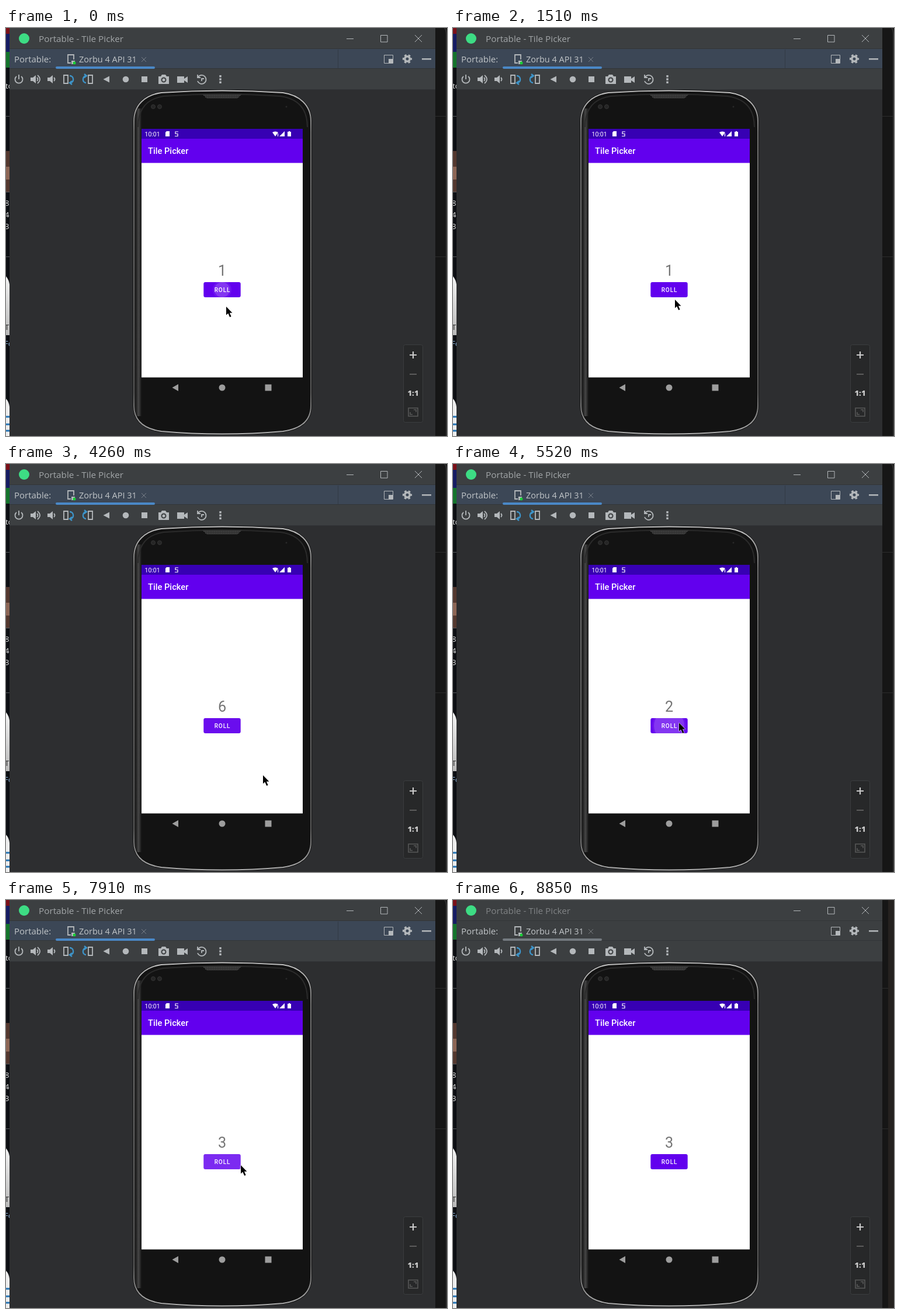
Animation, 755 px wide and 700 px high, one loop 8.95 s. Source, as an HTML page:

```html
<!DOCTYPE html>
<html lang="en">
<head>
<meta charset="utf-8">
<title>Tile Picker</title>
<style>
  html, body { margin: 0; width: 100%; height: 100%; overflow: hidden; background: #161616; }
  svg { display: block; width: 755px; height: 700px; }
  .ui { font-family: "Open Sans", sans-serif; }
  .app { font-family: Roboto, sans-serif; }
  .line { fill: none; stroke: #b4b8bb; stroke-width: 1.8; }
  .thin { fill: none; stroke: #b4b8bb; stroke-width: 1; }
  .icon { fill: #b4b8bb; }
  .blue { fill: none; stroke: #3d94c9; stroke-width: 2.3; }
  .nav { fill: #9d9d9d; }
  .bar { fill: #3c4756; }
  .tab { fill: #4a88c7; }
  .title { fill: #a2a6a8; }
  .blurred .bar { fill: #3c3f41; }
  .blurred .tab { fill: #747a80; }
  .blurred .title { fill: #808385; }
  .blurred .focused { display: none; }
  .behind { display: none; }
  .blurred .behind { display: inline; }
</style>
</head>
<body>
<svg id="stage" viewBox="0 0 755 700">
  <defs>
    <linearGradient id="rim">
      <stop offset="0" stop-color="#505050"/>
      <stop offset=".25" stop-color="#1d1d1d"/>
      <stop offset=".6" stop-color="#464646"/>
      <stop offset="1" stop-color="#151515"/>
    </linearGradient>
    <linearGradient id="edge" x2="0" y2="1">
      <stop offset="0" stop-color="#c4c4c4"/>
      <stop offset=".12" stop-color="#747474"/>
      <stop offset=".88" stop-color="#5c5c5c"/>
      <stop offset="1" stop-color="#b0b0b0"/>
    </linearGradient>
    <linearGradient id="paper" x2="0" y2="1">
      <stop offset="0" stop-color="#f4f4f4"/>
      <stop offset="1" stop-color="#b9b9b9"/>
    </linearGradient>
    <path id="body" d="M219 160C219 132 238 115 266 111Q370 104 474 111C502 115 522 132 522 160V648C522 675 503 688 474 692Q370 701 266 692C238 688 219 675 219 648Z"/>
    <clipPath id="bodyClip"><use href="#body"/></clipPath>
    <clipPath id="buttonClip"><rect x="338.300" y="436" width="63.400" height="26" rx="3"/></clipPath>
    <clipPath id="leftClip"><rect width="6" height="700"/></clipPath>
  </defs>

  <!-- desktop behind the window -->
  <rect width="755" height="700" fill="#161616"/>
  <g clip-path="url(#leftClip)">
    <rect width="6" height="700" fill="#0d0f13"/>
    <rect width="6" height="10" fill="#7b1018"/>
    <rect y="10" width="6" height="31" fill="#161c63"/>
    <rect y="41" width="6" height="27" fill="#14742c"/>
    <rect y="211" width="6" height="70" fill="#54382f"/>
    <rect y="238" width="6" height="22" fill="#8d6656"/>
    <path d="M0 426Q5 432 6 440V527H0Z" fill="url(#paper)"/>
    <path d="M0 636Q5 641 6 650V700H0Z" fill="#eee"/>
    <path d="M0 667H6M0 680H6M0 691H6" stroke="#2574b5" stroke-width="3"/>
    <path d="M0 151.500H6M0 392.500H6M0 281.500H6" stroke="#55585b"/>
    <g class="ui" font-size="13" fill="#e8e8e8">
      <text x="-1" y="104">to</text>
      <text x="-2" y="305">8</text><text x="-2" y="325">4</text><text x="-2" y="345">3</text>
      <text x="-3" y="546" fill="#8fb6df">Fo</text>
      <text x="-2" y="518" fill="#222">T</text>
    </g>
  </g>
  <path d="M735 151.500H753M735 392.500H753" stroke="#2c2c2c"/>
  <path d="M751 0Q754 4 754 12V700" fill="none" stroke="#303030" stroke-width="2"/>
  <rect class="behind" x="745" width="10" height="700" fill="#252220"/>

  <!-- window -->
  <rect x="6" width="729" height="700" fill="#2d2e30"/>
  <rect x="6" width="729" height="106" fill="#3c3f41"/>
  <rect class="bar" x="6" y="36" width="729" height="33"/>
  <path d="M6 35.500H735M6 69.500H735M6 105.500H735" stroke="#323538"/>
  <path class="focused" d="M568.500 37V69" stroke="#323a44"/>
  <rect class="tab" x="85" y="66" width="170" height="4" rx="2"/>
  <circle cx="31" cy="18" r="9" fill="#3ddc84"/>
  <g class="ui">
    <text class="title" x="56" y="24" font-size="15.300">Portable - Tile Picker</text>
    <g fill="#c1c5c8">
      <text x="14" y="59" font-size="15">Portable:</text>
      <text x="125" y="59" font-size="14.500">Zorbu 4 API 31</text>
    </g>
  </g>
  <path class="thin" d="M583 18.500H595M641.500 12.500H653V24H641.500ZM700 12L712 24M712 12L700 24"/>
  <path class="thin" stroke-opacity=".5" d="M232 50L240 58M240 50L232 58"/>
  <path class="line" d="M111 60H106V46H116V54"/>
  <path class="icon" d="M112 56H118V62H112Z"/>
  <circle cx="117" cy="60" r="2.500" fill="#19cf37"/>
  <path class="thin" d="M647.500 46.500H662.500V60.500H647.500Z"/>
  <path class="icon" d="M655 53H662V60H655ZM712 52H728V54.500H712Z"/>
  <g transform="translate(687 53)">
    <circle class="line" r="4.300" style="stroke-width:3.600"/>
    <circle class="line" r="6.700" style="stroke-width:2.800" stroke-dasharray="3.508" stroke-dashoffset="1.754"/>
  </g>

  <!-- toolbar -->
  <path class="line" d="M18 83A6.500 6.500 0 1 0 26 83M22 80V88"/>
  <path class="icon" d="M42 85H46L51 81V95L46 91H42ZM71 85H75L80 81V95L75 91H71Z"/>
  <path class="line" d="M53 85Q56 88 53 91M54 81Q62 88 54 95M82 85Q85 88 82 91"/>
  <path class="line" d="M99 81H106V95H99ZM141 81H148V95H141Z"/>
  <path class="blue" d="M109 82C117 82 117 94 110 94M113 91L109 94L113 97M138 82C130 82 130 94 137 94M134 79L138 82L134 85"/>
  <path class="icon" d="M177 82.500V93.500L166.500 88ZM232 83H242V93H232ZM293 83H305V94H293ZM305 87L311 83V94L305 90Z"/>
  <circle class="icon" cx="205" cy="88" r="5.300"/>
  <path class="icon" d="M261 83H265L267 80H273L275 83H279V96H261Z"/>
  <circle cx="270" cy="89" r="3.500" fill="none" stroke="#3c3f41" stroke-width="2"/>
  <path class="line" d="M329 84A7.500 7.500 0 1 1 328 91M328 80V85H333M335 91V87H339"/>
  <path class="icon" d="M365.300 81h3.400v3.400h-3.400zM365.300 86.300h3.400v3.400h-3.400zM365.300 91.600h3.400v3.400h-3.400z"/>

  <!-- phone -->
  <use href="#body" fill="#131313"/>
  <g clip-path="url(#bodyClip)">
    <rect x="219" y="138" width="13" height="528" fill="url(#rim)"/>
    <path d="M226 170C226 137 243 121 270 117Q370 110 470 117C498 121 516 137 516 170" fill="none" stroke="#2b2b2b" stroke-width="2"/>
    <path id="cleared" d="M338 599H508V634H338ZM512 436H521V650H512Z"/>
  </g>
  <use href="#body" fill="none" stroke="#101010" stroke-width="3.600"/>
  <use href="#body" fill="none" stroke="url(#edge)" stroke-width="2"/>
  <path d="M336 113H404L396 121H344Z" fill="#303030"/>
  <path d="M338 115.500H402M341 118.500H399" stroke="#505050" stroke-dasharray="2 1"/>
  <g fill="#262626" stroke="#343434"><circle cx="252" cy="135" r="3.500"/><circle cx="263" cy="135" r="3.500"/></g>
  <circle cx="480" cy="135" r="1.500" fill="#292929"/>
  <path class="nav" d="M295 611V623L284.500 617ZM443.500 611.500H454.500V622.500H443.500Z"/>
  <circle class="nav" cx="370" cy="617" r="5.500"/>

  <!-- app -->
  <rect x="232" y="173" width="276" height="426.500" fill="#fff"/>
  <rect x="232" y="190" width="276" height="41.500" fill="#6200ee"/>
  <rect x="232" y="173" width="276" height="17" fill="#3700b3"/>
  <g class="app" fill="#fff">
    <text x="237.500" y="186" font-size="10.500">10:01</text>
    <text x="243" y="216" font-size="14.700" font-weight="500">Tile Picker</text>
    <path d="M275 177H280V186H273V179ZM456 179Q461 176 466 179L461 186ZM468 186L477 177V186ZM483 178H484V177H486V178H488V186H482V178Z"/>
    <path d="M295 178H290V181.500H294V185.500H289" fill="none" stroke="#fff" stroke-width="1.200"/>
    <path d="M465.500 181V186" stroke="#fff" stroke-width="1.200"/>
  </g>
  <text id="face" class="app" x="370" y="425.400" font-size="25.200" text-anchor="middle" fill="#757575">1</text>
  <g clip-path="url(#buttonClip)">
    <rect x="338" y="436" width="64" height="26" fill="#6200ee"/>
    <g id="ripple" fill="#fff">
      <circle id="rippleInner" cx="370" cy="449"/>
      <circle id="rippleOuter" cx="370" cy="449" opacity=".35"/>
    </g>
  </g>
  <text class="app" x="356.700" y="453" font-size="10" font-weight="500" letter-spacing=".9" fill="#fff">ROLL</text>

  <!-- zoom panel -->
  <rect x="680.500" y="543.500" width="33" height="133" rx="3" fill="#272829" stroke="#3b3d3f"/>
  <path d="M691 561H703M697 555V567" stroke="#c9c9c9" stroke-width="2.200"/>
  <path d="M691 594H703" stroke="#5c5c5c" stroke-width="2"/>
  <text class="ui" x="697" y="630.500" font-size="13" font-weight="800" text-anchor="middle" fill="#c9c9c9">1:1</text>
  <path d="M689 652H705V666H689ZM692 659V663H696M698 655H702V659" fill="none" stroke="#585858" stroke-width="1.600"/>

  <path id="cursor" d="M0 0V14.500L3.300 11.500L6.100 18L8.600 17L5.900 10.700H10.400Z" stroke="#fff" paint-order="stroke"/>
</svg>
<script>
  const LOOP = 8950, STEP = 125, BLUR = 8850;
  const $ = id => document.getElementById(id);

  // the pointer travels from its last place to (x, y)
  const glides = [
    { from: 0, to: 600, x: 375, y: 512 },
    { from: 870, to: 990, x: 376, y: 529 },
    { from: 990, to: 1510, x: 380, y: 466 },
    { from: 1630, to: 2110, x: 379, y: 453 },
    { from: 2510, to: 2870, x: 385, y: 495 },
    { from: 2870, to: 3020, x: 390, y: 466 },
    { from: 3020, to: 3380, x: 388, y: 447 },
    { from: 3870, to: 4260, x: 440, y: 534 },
    { from: 4260, to: 4620, x: 447, y: 466 },
    { from: 4620, to: 5000, x: 387, y: 444 },
    { from: 7660, to: 8330, x: 750, y: 720, ease: p => p * p }
  ];
  const presses = [
    { down: -120, release: 120, end: 600, face: 1 },
    { down: 2390, release: 2630, end: 3140, face: 2 },
    { down: 3750, release: 4020, end: 4380, face: 6 },
    { down: 5280, release: 5770, end: 5890, face: 2 },
    { down: 7540, release: 7790, end: 8330, face: 3 }
  ];

  // progress from 0 to 1 in even jumps, as a screen recorder sees it
  function progress(t, from, to) {
    const jumps = Math.round((to - from) / STEP);
    const p = Math.min(1, Math.max(0, (t - from) / (to - from)));
    return Math.floor(p * jumps + .01) / jumps;
  }

  function pointerAt(t) {
    let x = 377, y = 478;
    for (const { from, to, x: nextX, y: nextY, ease = p => p } of glides) {
      const p = ease(progress(t, from, to));
      x += (nextX - x) * p;
      y += (nextY - y) * p;
    }
    return `translate(${Math.round(x)} ${Math.round(y)})`;
  }

  function rippleAt(t, { down, release, end }) {
    const radius = 13 + 26 * progress(t, down, down + 2 * STEP);
    const fade = t < release ? 0 : progress(t + STEP, release, end + STEP);
    return { radius, opacity: .21 * (1 - fade) };
  }

  function draw(t) {
    $("cursor").setAttribute("transform", pointerAt(t));

    const press = presses.filter(({ down }) => down <= t).pop();
    const { radius, opacity } = rippleAt(t, press);
    $("rippleInner").setAttribute("r", radius);
    $("rippleOuter").setAttribute("r", radius + 3);
    $("ripple").setAttribute("opacity", opacity);

    const rolled = presses.filter(({ down }) => down + 120 <= t).pop();
    $("face").textContent = rolled.face;

    $("cleared").style.display = t >= 8060 && t < BLUR ? "inline" : "none";
    $("stage").classList.toggle("blurred", t >= BLUR);
  }

  const start = performance.now();
  function tick() {
    draw((performance.now() - start) % LOOP);
    requestAnimationFrame(tick);
  }
  tick();
</script>
</body>
</html>
```
